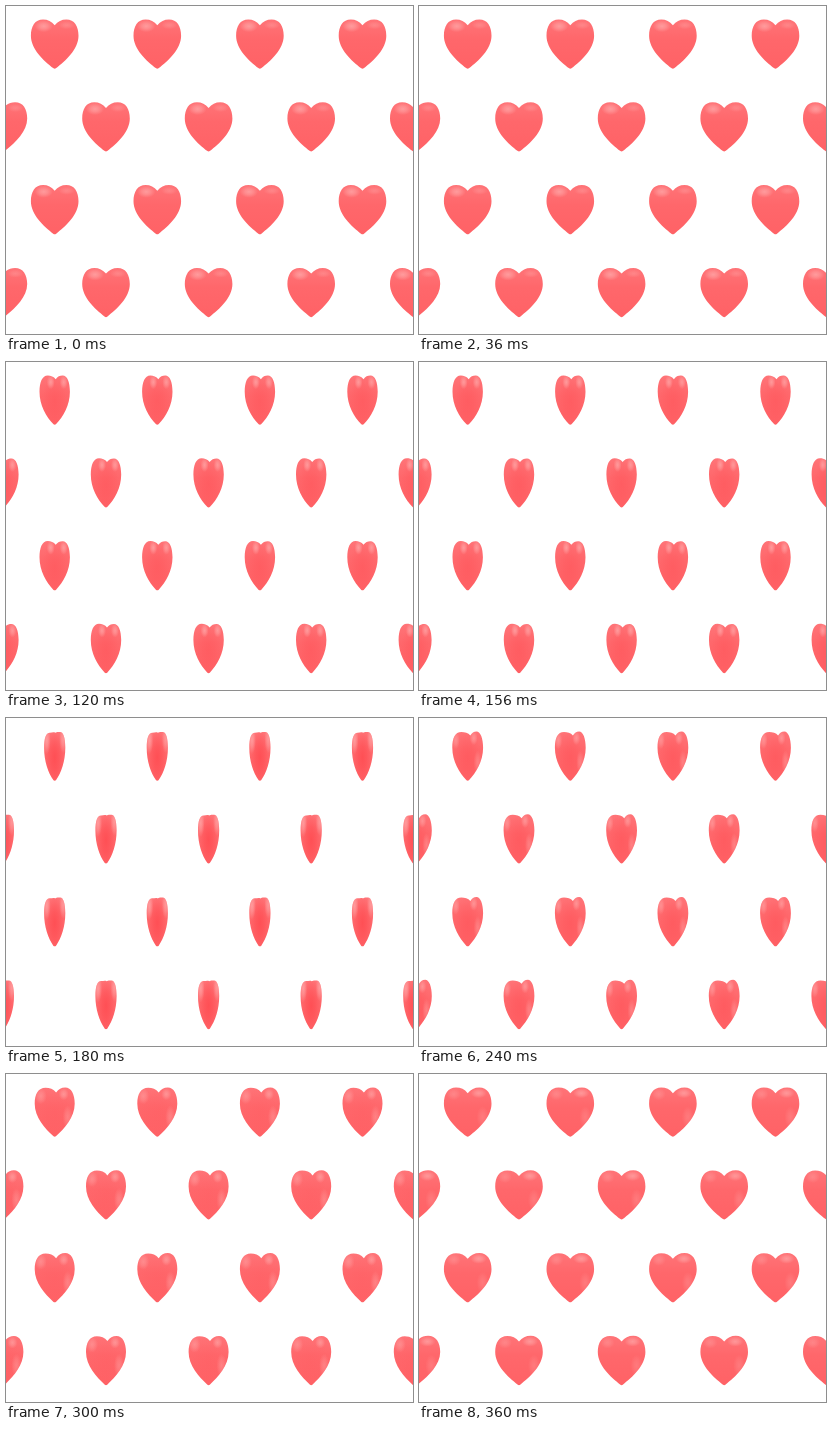
Recreate the animation shown at these times as an HTML page with a canvas. Size 407x328 px, loop 420 ms.

```html
<!DOCTYPE html>
<html lang="en">
<head>
<meta charset="utf-8">
<title>Turning hearts</title>
<style>
  html, body { margin: 0; width: 100%; height: 100%; overflow: hidden; background: #fff; }
  canvas { display: block; width: 407px; height: 328px; }
</style>
</head>
<body>
<canvas id="stage"></canvas>
<script>
const STEP = 60, W = 407, H = 328;
const TALL = 49.6, PITCH_X = 102.6, PITCH_Y = 82.8;

// half: half width, notch: [x, y] of the dip, lift: lobe tops [left, right],
// belly: fullness of the lower sides, shines: [x, y, rx, ry, alpha], core: dark middle
const poses = [
  { half: 23.8, notch: [0, 6], lift: [0.3, 0.3], belly: 0.46, core: 0,
    shines: [[-11, 7, 9, 6, 0.6], [12, 6, 8, 4, 0.3]] },
  { half: 20, notch: [0.5, 5], lift: [0.2, 0.4], belly: 0.48, core: 0.15,
    shines: [[-8, 8, 6, 7, 0.65], [15, 9, 4, 9, 0.6]] },
  { half: 15.2, notch: [1, 4], lift: [0.2, 0.4], belly: 0.56, core: 0.3,
    shines: [[-4, 7, 4, 7, 0.6], [9, 7, 4, 7, 0.55]] },
  { half: 10.6, notch: [0.5, 1.6], lift: [1.5, 0.8], belly: 0.62, core: 0.75,
    shines: [[-8, 9, 4, 14, 0.6], [8.5, 8, 4, 14, 0.55]] },
  { half: 15.4, notch: [2.6, 4.2], lift: [0.8, 0.2], belly: 0.54, core: 0.35,
    shines: [[-12, 9, 4, 9, 0.45], [6, 7, 4, 7, 0.5], [10, 31, 4, 12, 0.35]] },
  { half: 20, notch: [1.4, 5.4], lift: [0.6, 0.3], belly: 0.48, core: 0.1,
    shines: [[-14, 9, 6, 8, 0.4], [9, 7, 5, 6, 0.5], [13, 30, 5, 12, 0.35]] },
  { half: 23.8, notch: [0, 6], lift: [0.4, 0.2], belly: 0.46, core: 0,
    shines: [[-14, 7, 7, 6, 0.3], [11, 6, 8, 5, 0.55], [15, 30, 6, 11, 0.25]] }
];

const canvas = document.getElementById("stage");
const ctx = canvas.getContext("2d");
const scale = window.devicePixelRatio || 1;
canvas.width = W * scale;
canvas.height = H * scale;

function heartPath({ half, notch: [nx, ny], lift, belly }) {
  const p = new Path2D();
  const side = 16.5;
  const lobe = s => nx * 0.5 + s * half * 0.49;
  p.moveTo(nx, ny);
  p.bezierCurveTo(nx - half * 0.13, ny * 0.35, lobe(-1) + half * 0.2, lift[0], lobe(-1), lift[0]);
  p.bezierCurveTo(-half * 0.83, lift[0], -half, 7, -half, side);
  p.bezierCurveTo(-half, 30, -half * belly, 41.5, -1.2, TALL - 0.5);
  p.quadraticCurveTo(0, TALL + 0.4, 1.2, TALL - 0.5);
  p.bezierCurveTo(half * belly, 41.5, half, 30, half, side);
  p.bezierCurveTo(half, 7, half * 0.83, lift[1], lobe(1), lift[1]);
  p.bezierCurveTo(lobe(1) - half * 0.2, lift[1], nx + half * 0.13, ny * 0.35, nx, ny);
  p.closePath();
  return p;
}

function glow(x, y, rx, ry, rgb, alpha) {
  ctx.save();
  ctx.translate(x, y);
  ctx.scale(rx, ry);
  const g = ctx.createRadialGradient(0, 0, 0, 0, 0, 1);
  g.addColorStop(0, `rgba(${rgb},${alpha})`);
  g.addColorStop(0.45, `rgba(${rgb},${alpha * 0.65})`);
  g.addColorStop(1, `rgba(${rgb},0)`);
  ctx.fillStyle = g;
  ctx.fillRect(-1, -1, 2, 2);
  ctx.restore();
}

function drawHeart(pose, path, x, y) {
  ctx.save();
  ctx.translate(x, y);
  const base = ctx.createLinearGradient(0, 0, 0, TALL);
  base.addColorStop(0, "#ff7478");
  base.addColorStop(0.4, "#ff676b");
  base.addColorStop(1, "#ff6266");
  ctx.fillStyle = base;
  ctx.fill(path);
  ctx.clip(path);
  if (pose.core) glow(0, 26, pose.half * 0.85, 27, "255,72,78", pose.core);
  for (const [sx, sy, rx, ry, a] of pose.shines) glow(sx, sy, rx, ry, "255,184,184", a);
  ctx.restore();
}

function drawPose(pose) {
  ctx.setTransform(scale, 0, 0, scale, 0, 0);
  ctx.fillStyle = "#fff";
  ctx.fillRect(0, 0, W, H);
  const path = heartPath(pose);
  for (let row = 0; row < 4; row++) {
    const left = row % 2 ? -2.6 : 48.7;
    for (let x = left; x < W + 24; x += PITCH_X) {
      drawHeart(pose, path, x, 13.2 + row * PITCH_Y);
    }
  }
}

const start = performance.now();
let shown = -1;

function tick() {
  const step = Math.floor((performance.now() - start) / STEP) % poses.length;
  if (step !== shown) drawPose(poses[shown = step]);
  requestAnimationFrame(tick);
}
tick();
</script>
</body>
</html>
```
